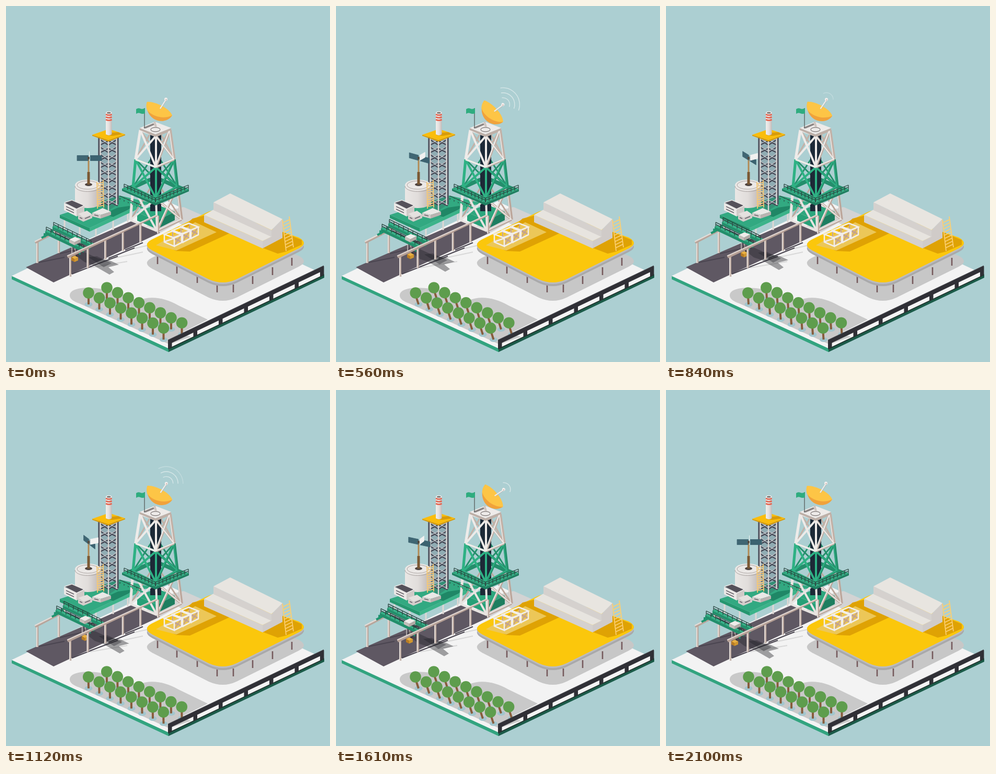
Animation, 620 px wide and 680 px high, one loop 2240 ms. Source, as an HTML page with a canvas:

```html
<!DOCTYPE html>
<html lang="en">
<head>
<meta charset="utf-8">
<title>Isometric station</title>
<style>
html, body { margin: 0; width: 100%; height: 100%; overflow: hidden; background: #accfd2; }
canvas { display: block; }
</style>
</head>
<body>
<canvas id="stage" width="620" height="680"></canvas>
<script>
const ctx = document.getElementById('stage').getContext('2d');
const STEP = 70, LAST = 30, LOOP = 2240;
const TAU = Math.PI * 2;

const fill = (color, d) => { ctx.fillStyle = color; ctx.fill(new Path2D(d)); };
const line = (color, width, d) => {
  ctx.strokeStyle = color;
  ctx.lineWidth = width;
  ctx.stroke(new Path2D(d));
};
const oval = (color, x, y, rx, ry = rx) => {
  ctx.fillStyle = color;
  ctx.beginPath();
  ctx.ellipse(x, y, rx, ry, 0, 0, TAU);
  ctx.fill();
};
const mix = (a, b, t) => [a[0] + (b[0] - a[0]) * t, a[1] + (b[1] - a[1]) * t];
const moved = (x, y, draw) => { ctx.save(); ctx.translate(x, y); draw(); ctx.restore(); };
const across = (x0, x1, ...stops) => {
  const g = ctx.createLinearGradient(x0, 0, x1, 0);
  stops.forEach((c, i) => g.addColorStop(i / (stops.length - 1), c));
  return g;
};
const hump = t => (1 - Math.cos(TAU * t)) / 2;
// Two swings per loop; the first one lasts n steps.
const swing = (k, n) => k < n ? hump(k / n) : k < 15 ? 0 : hump((k - 15) / 15);

function railing(a, b, count, height, color = '#29423d') {
  let d = '';
  for (const h of [height, height / 2]) d += `M${a[0]},${a[1] - h}L${b[0]},${b[1] - h}`;
  for (let i = 0; i <= count; i++) d += `M${mix(a, b, i / count)}v${-height}`;
  line(color, 1.2, d);
}

function ladder(a, b, c, e, rungs, color) {
  let d = `M${a}L${b}M${c}L${e}`;
  for (let i = 1; i < rungs; i++) d += `M${mix(a, b, i / rungs)}L${mix(c, e, i / rungs)}`;
  line(color, 1.8, d);
}

function ground() {
  fill('#32a47f', 'M11 516L311 654V661L11 522z');
  fill('#1b5b49', 'M311 653L609 512V519L311 661z');
  fill('#f3f3f3', 'M11 515.5L309 373L609 513L311 654z');
  fill('#d3d3d3', 'M318 389L340 384L392 407L350 426L330 414L290 436L262 424z');
  line('#d8d8d8', 2, 'M196 484L262 470M228 467L282 455M161 500L232 488');
  fill('#5f5863', 'M38 499L240 411L295 433L91 528z');
  fill('#c9c9c9', 'M122 553C122 536 165 533 215 548L252 563C275 553 302 556 330 572L386 599L334 625L354 632L312 646L140 568Q122 562 122 553z');
  line('#4a4550', 2, 'M62 490L112 480M103 473L150 462M126 512L182 490M161 498L214 478M196 482L246 462M228 466L262 452');
}

function fence() {
  fill('#303036', 'M310 638L608 496V505L310 647z');
  for (let i = 0; i < 7; i++) {
    const x = 310 + i * 48.5, y = 639 - i * 23.1;
    fill('#303036', `M${x} ${y}l7.5-3.5v17l-7.5 3.5z`);
  }
  line('#4a4a50', 1, 'M310 638L608 496');
  line('#24332f', 1.5, 'M311 655L608 514');
}

const deck = 'M279 446L385 394Q402 386 420 394L560 442Q580 453 560 463L441 522Q415 534 388 522L280 467Q260 456 279 446z';

function yellowDeck() {
  moved(0, 35, () => fill('#c7c7c7', deck));
  const legs = [[290, 478], [327, 496], [366, 514], [404, 532], [435, 532], [472, 516], [510, 499], [547, 481]];
  for (const p of legs) line('#765a5d', 2.6, `M${p}v15`);
  moved(0, 7, () => fill('#a9a9ab', deck));
  moved(0, 3, () => fill('#bcbcbe', deck));
  fill('#fbc70c', deck);
  fill('#dfa204', 'M357 406L381 400V414L428 434L352 469L326 468L300 456z');
  fill('#dfa204', 'M491 462L522 427L530 432L566 447V456L536 469L520 473z');
  fill('#ecc758', 'M287 457L362 413L403 432L326 467z');

  fill('#d0cbc8', 'M491 449L508 440V428L529 407V443L491 463z');
  fill('#d5d1ce', 'M379 399L491 449V463L379 413z');
  fill('#e7e4df', 'M379 399L397 389L509 440L491 449z');
  fill('#d5d1ce', 'M397 375L508 428V441L397 390z');
  fill('#e8e5e0', 'M397 375L429 358L529 407L508 428z');
  ladder([529, 408], [536, 468], [542, 402], [550, 461], 10, '#fbcf73');

  for (let i = 2; i >= 0; i--) moved(i * 16, -i * 7.5, () => {
    line('#c5a38d', 2.2, 'M303 436V450M319 429V444L336 451M303 450L319 444M322 443L336 451M336 437L322 457');
    line('#f2eeea', 2.6, 'M303 436L322 443L336 437L318 430zM303 436V451L322 459V443M322 459L336 452V437M304 450L321 444');
  });
}

function leftDeck() {
  line('#ded8d4', 3, 'M112 404V434M141 420V446M172 424V440M205 408V428M233 394V413');
  fill('#25976f', 'M103 399L160 424V431L103 405z');
  fill('#3bb389', 'M160 424L252 381V388L160 431z');
  fill('#32a981', 'M103 399L217 362L286 378L252 381L160 424z');
  fill('#1f8766', 'M188 397L214 385L242 381L234 389L205 403z');
}

function latticeTower() {
  fill('rgba(62,70,84,.25)', 'M177 251L196 256L215 251V378L196 391L177 379z');
  for (let i = 0; i < 9; i++) {
    const y = 253 + i * 14.4;
    const d = `M178 ${y}L196 ${y + 12}M196 ${y + 4}L178 ${y + 13}M214 ${y}L196 ${y + 12}M196 ${y + 4}L214 ${y + 13}`;
    line('#444855', 3.4, d);
    moved(0, -1.5, () => line('#c5cace', 1.2, d));
  }
  line('#50525e', 3.4, 'M178 250V379M214 250V379');
  line('#d9d5d3', 2.4, 'M196 254V391M180.5 251V380M211.5 251V380');
  fill('#d99a06', 'M165 246L196 256L228 245V247L196 259L165 248z');
  fill('#fabd0c', 'M165 246L197 235L228 245L196 256z');
  fill('#d79b0b', 'M202 242L215 241L222 245L204 248L192 247z');
  const metal = across(191, 203, '#f1eeec', '#e4dfdd', '#bfb8b6');
  fill(metal, 'M191 204H202.5V245Q197 249 191 245z');
  for (const y of [207, 212, 217]) line('#e4634f', 2.7, `M191 ${y}Q197 ${y + 3} 202.5 ${y}`);
  oval('#f1eeec', 196.8, 204, 5.8, 2.8);
  oval('#77716f', 196.8, 204, 3.9, 1.6);
}

function tank() {
  fill(across(132, 181, '#eae7e5', '#e1dddb', '#bdb6b4'), 'M132 343V376A24.5 10 0 0 0 181 376V343z');
  oval('#ebe8e6', 156.5, 342, 24.5, 10.5);
  line('#aaa3a1', 1, 'M136 342A20.5 8 0 0 0 177 342A20.5 8 0 0 0 136 342M132 344A24.5 10.5 0 0 0 181 344');
  oval('#4f4541', 158, 341, 7, 3);
  line('#b38a55', 3, 'M158 292V320');
  line('#7b5934', 5, 'M158 317V341');
}

function sheds() {
  ladder([174, 336], [175, 387], [186, 332], [187, 385], 12, '#f4c877');
  fill('#ebe8e6', 'M111 376L135 388V402L111 390z');
  fill('#d0cac8', 'M135 388L150 382V395L135 402z');
  fill('#ebe8e6', 'M111 375L126 370L151 381L135 389z');
  fill('#55515a', 'M113 376L126 371.5L148 381L135 387z');
  fill('#e5e1df', 'M138 397L155 391L165 398L148 405z');
  fill('#d3cdcb', 'M138 397L148 404V412L138 407zM148 404L165 398V405L148 412z');
  fill('#ebe8e6', 'M165 395L185 386L201 393L181 399z');
  fill('#d3cdcb', 'M165 395L181 399V406L165 402z');
  fill('#bbb3b1', 'M181 399L201 393V399L181 406z');
  line('#67626a', 1.5, 'M115 383L130 390M115 388L130 395M141 404L146 406M151 406L161 402M169 399L177 401');
}

const left = [[257, 237], [248, 293], [243, 346], [238, 409]];
const mid = [[287, 248], [287, 308], [287, 368], [289, 430]];
const right = [[314, 237], [322, 293], [328, 345], [336, 408]];

function face(outer, i, color, width) {
  const [a, b, c, d] = [outer[i], outer[i + 1], mid[i], mid[i + 1]];
  line(color, width, `M${a}L${d}M${c}L${b}M${b}L${d}M${a}L${c}`);
  line(color, width + 1.2, `M${a}L${b}`);
}

function section(i, light, dark) {
  const back = [286, 226 + i * 53], next = [287, 279 + i * 53];
  line(dark, 3, `M${left[i]}L${next}M${left[i + 1]}L${back}M${right[i]}L${next}M${right[i + 1]}L${back}`);
  fill('#1c2937', `M276 ${246 + i * 52}h21v${i > 1 ? 42 : 56}h-21z`);
  face(right, i, dark, 4.4);
  face(left, i, light, 4);
  moved(-1, -.8, () => line(light, 2.2, `M${right[i]}L${mid[i + 1]}M${mid[i]}L${right[i + 1]}L${mid[i + 1]}`));
  line(light, 4, `M${mid[i]}L${mid[i + 1]}`);
  moved(-1.5, 0, () => line(light, 1.6, `M${right[i]}L${right[i + 1]}`));
}

function mainTower() {
  fill('#2da67d', 'M251 394L288 379L323 393L289 410z');
  fill('#27a077', 'M251 394L289 410V426L251 410z');
  fill('#1e7e60', 'M289 410L323 393V409L289 426z');
  section(2, '#e8e4e1', '#bca69b');
  fill('#248e6c', 'M222 349L286 324L350 350L336 354L286 331L236 354z');
  section(1, '#2eb184', '#24906c');
  section(0, '#eeebe9', '#c3b1a7');

  fill('#1f8061', 'M222 349L286 376L350 350V354L286 381L222 353z');
  fill('#30a980', 'M222 349L234 344L286 368L338 345L350 350L286 376z');
  railing([226, 348], [286, 375], 9, 8);
  railing([286, 375], [349, 350], 9, 8);
  railing([218, 370], [258, 387], 5, 7);
  line('#30a980', 3, 'M217 365L262 386');

  fill('#beb0a8', 'M256 233L286 245L316 233V237L286 250L256 237z');
  fill('#eeebe9', 'M256 233L285 221L316 233L286 245z');
  line('#8b8584', 1.3, 'M277 236A9 4 0 0 0 295 236A9 4 0 0 0 277 236');
  fill('#8b8584', 'M263 232L282 224L284 227L267 234z');
  line('#626a68', 1.5, 'M265 195V234');
  fill('#2fac7f', 'M249 197Q253 194 257 196T266 195V205Q261 207 257 205T249 206z');
}

function rails() {
  for (const p of [[60, 451], [101, 432]]) {
    line('#b9a59b', 4.5, `M${p}v40`);
    line('#e5dcd7', 2.2, `M${p[0] - 1},${p[1]}v40`);
  }
  fill('#b9a59b', 'M55 451L109 424V427L57 454z');
  line('#e5dcd7', 2, 'M55 450L109 423');
}

function frontRail() {
  for (let i = 0; i < 6; i++) {
    const x = 123 + i * 33.6, y = 478 - i * 15.5;
    line('#b9a59b', 4, `M${x} ${y}v${39 - i}`);
    line('#e5dcd7', 2, `M${x - 1} ${y}v${39 - i}`);
  }
  fill('#b59f95', 'M117 478L289 399V402L119 482z');
  line('#e0d6d0', 2, 'M117 477.5L289 399');
}

function beam(x, y) {
  const end = [x + 74, y + 35];
  fill('#228f6b', `M${x} ${y}l74 35v6l-74-35z`);
  fill('#34b187', `M${x} ${y}l5-2.5l74 35l-5 2.5z`);
  railing([x + 2, y], end, 8, 8);
}

function craneShadow() {
  fill('rgba(40,40,44,.42)', 'M128 472L141 466L176 482L201 487L216 494L196 499L207 508L198 513L165 494L150 489z');
  fill('rgba(30,30,36,.35)', 'M158 480L174 478L202 491L187 499z');
}

function crane() {
  line('#1f9470', 4, 'M68 443L91 431M74 434V442M88 427V434');
  beam(89, 421);
  fill('#2b323a', 'M97 434L146 457L142 459L93 436z');
  line('#d8d1cb', 1.3, 'M126 456V478M132 458V478');
  beam(75, 430);
  fill('#c6bfbb', 'M121 446L131 451V457L121 452z');
  fill('#b3aaa6', 'M131 451L143 445V451L131 457z');
  fill('#efecea', 'M121 446L132 441L143 445L131 451z');
  fill('#2ea47c', 'M137 468L160 456L163 459L140 472z');
  line('#1f9470', 3, 'M141 468V475M160 458V464');
  line('#40332a', 1.4, 'M131 466V478M126 479L131 474L137 479');
  fill('#e9b043', 'M125 480L131 477L138 480L131 484z');
  fill('#b87c24', 'M125 480L131 483V489L125 486z');
  fill('#d0962f', 'M131 483L138 480V486L131 489z');
}

function blade(angle, r, color) {
  const dx = Math.cos(angle), dy = Math.sin(angle) * .4;
  const at = n => `${159.5 + dx * n} ${285.5 + dy * n}`;
  const d = `M${at(2)}L${at(r)}v10L${159.5 + dx * 2} ${295.5 + dy * 2}z`;
  fill(color, d);
  line(color, .8, d);
}

function turbine(angle) {
  blade(angle, 23.5, '#3b6270');
  blade(angle + Math.PI, 23.5, '#3f6673');
  blade(angle - Math.PI / 2, 19, '#f1f1f0');
  line('#54483c', 3.5, 'M158 288V293');
}

function dish(angle, phase) {
  line('#cfc5bf', 4, 'M284 221L287 231');
  ctx.save();
  ctx.translate(284.5, 220);
  ctx.rotate(angle);
  ctx.translate(-284.5, -220);
  fill('#f0a23b', 'M270 183C267 195 272 208 282 215C293 223 311 221 318 209C305 206 281 197 270 183z');
  fill('#fdc546', 'M270 183C285 182 313 195 318 209C304 216 282 213 270 199Q267 190 270 183z');
  line('#efecea', 2.2, 'M295 196L306 179');
  line('#b8b5b3', .8, 'M297 196L307 180');
  oval('#f3efed', 306, 178, 3);
  oval('#cdb6b2', 306.5, 179, 1.3);
  if (phase < 8) for (let i = 0; i < 3; i++) {
    const alpha = Math.min(1, (phase - 2 * i) / 2);
    if (alpha <= 0) continue;
    ctx.strokeStyle = `rgba(238,245,245,${alpha * .65})`;
    ctx.lineWidth = 1.4;
    ctx.beginPath();
    ctx.arc(306, 178, 13 + i * 9.5, -2.08, 0);
    ctx.stroke();
  }
  ctx.restore();
}

function trees(lean) {
  for (const [x0, y0] of [[193, 538], [158, 548]]) {
    for (let i = 0; i < 8; i++) {
      const x = x0 + i * 20.5, y = y0 + i * 9.6;
      oval('#a3c6ce', x, y + 22, 7.5, 4.5);
      line('#885d3c', 4, `M${x} ${y + 22}L${x - lean} ${y + 4}`);
      oval('#5e9d4d', x - lean, y, 10.8);
    }
  }
}

function render(k) {
  const travel = hump(k / LAST), shift = [20 * travel, -9.8 * travel];
  ctx.fillStyle = '#accfd2';
  ctx.fillRect(0, 0, 620, 680);
  ground();
  moved(...shift, craneShadow);
  yellowDeck();
  rails();
  leftDeck();
  latticeTower();
  tank();
  turbine(1.1 * travel);
  sheds();
  mainTower();
  dish(.41 * swing(k, 13), (k + 9) % 10);
  moved(...shift, crane);
  frontRail();
  trees(6 * swing(k, 14));
  fence();
}

const start = performance.now();
function tick() {
  const t = (performance.now() - start) % LOOP;
  render(Math.min(Math.floor(t / STEP), LAST));
  requestAnimationFrame(tick);
}
tick();
</script>
</body>
</html>
```
